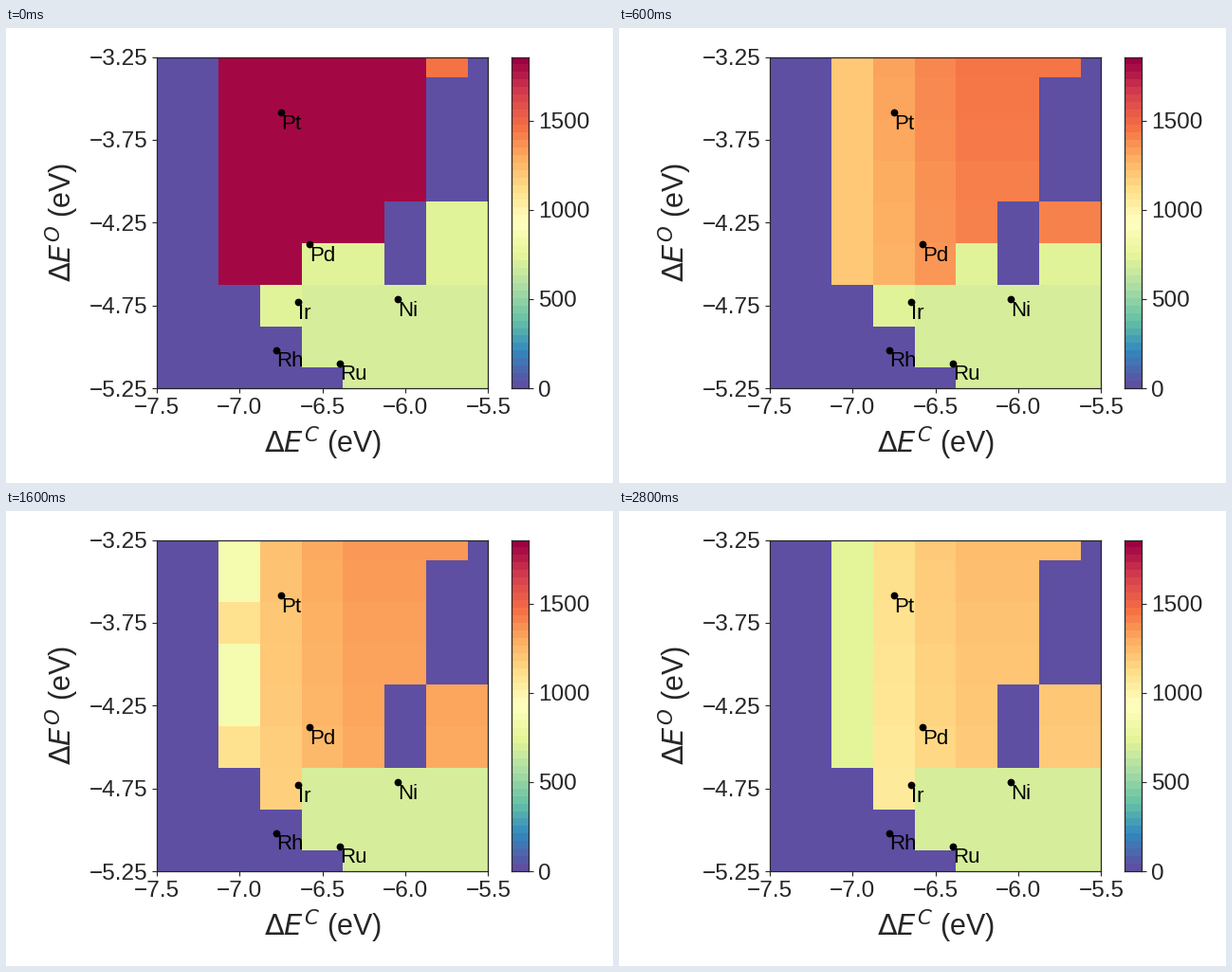
Animation of 640 by 480 pixels, one loop 3 s. Source, as a matplotlib script:

```python
import numpy as np
import matplotlib as mpl
import matplotlib.pyplot as plt
from matplotlib.animation import FuncAnimation

W, H = 640, 480
FRAMES, INTERVAL = 15, 200
VMAX = 1856
DARK = "#262626"

mpl.rcParams.update({
    "font.family": "Liberation Sans",
    "mathtext.fontset": "dejavusans",
    "axes.edgecolor": DARK,
    "axes.linewidth": 0.9,
    "xtick.color": DARK,
    "ytick.color": DARK,
    "xtick.labelsize": 17.6,
    "ytick.labelsize": 17.6,
})

# Nine by nine cells, row 0 at the top.
row, col = np.indices((9, 9))

# Cells that stay at zero: left side, lower-left stairs, notch, right block.
dead = (col < 2) | (row > col + 3)
dead |= (col == 6) & (row > 3) & (row < 6)
dead |= (col > 6) & (row < 4) & (row + col != 7)

# Step at which each cell becomes hot; the lower right never does.
onset = np.zeros((9, 9))
onset[4, 7:] = 1
onset[5, 4] = 1
onset[5, 5:] = 4
onset[6, 3] = 5
onset[6, 4:] = onset[7:] = np.inf
cool = np.where((onset > 0) & (onset < np.inf), 730, 695)

# Columns left of centre lose heat faster; heat also falls down the rows.
dist = np.maximum(0, 5 - col)
loss = 15 * dist**2 + 35 * dist + np.where(col > 2, 10 * (row - 2), 0)

# The leftmost hot column collapses; every third row does so later.
collapse = np.where(row % 3 == 2, 9, 5)


def grid(t):
    heat = np.interp(t, [0, 1, 3, 4, 5, 8, 10, 14],
                     [1830, 1605, 1443, 1385, 1385, 1340, 1278, 1225])
    if t < 1:
        heat = np.where(col > 6, 1470, heat)
    spread = np.interp(t, [0, 1, 3], [0, 0.15, 1])
    drop = 250 * (col == 2) * np.clip((t - collapse) / 1.5, 0, 1)
    g = np.where(t >= onset, heat - spread * loss - drop, cool)
    return np.where(dead, 0, g)


def pixel_axes(x, y, w, h):
    return fig.add_axes([x / W, 1 - (y + h) / H, w / W, h / H])


fig = plt.figure(figsize=(W / 100, H / 100), dpi=100, facecolor="white")

ax = pixel_axes(158.9, 30.55, 349.5, 349.5)
mesh = ax.pcolormesh(np.linspace(-7.625, -5.375, 10),
                     np.linspace(-3.125, -5.375, 10), grid(0),
                     cmap="Spectral_r", vmin=0, vmax=VMAX)
ax.set(xlim=(-7.5, -5.5), ylim=(-5.25, -3.25),
       xticks=np.arange(-7.5, -5.4, 0.5), yticks=np.arange(-5.25, -3.2, 0.5))
ax.xaxis.set_major_formatter(lambda v, _: f"{v:.1f}".replace("-", "\u2212"))
ax.yaxis.set_major_formatter(lambda v, _: f"{v:.2f}".replace("-", "\u2212"))

bar = pixel_axes(533, 30.55, 18, 349.5)
bar.pcolormesh([0, 1], np.linspace(0, VMAX, 45), np.arange(44)[:, None],
               cmap="Spectral_r")
bar.set(xticks=[], yticks=range(0, 1501, 500))
bar.yaxis.tick_right()

for x, y, label, angle in ((334.5, 448, "C", 0), (69, 205, "O", 90)):
    fig.text(x / W, 1 - y / H, rf"$\Delta E^{label}$ (eV)", color=DARK,
             fontsize=22, ha="center", va="baseline",
             rotation=angle, rotation_mode="anchor")

metals = {"Pt": (-6.75, -3.585), "Pd": (-6.58, -4.38), "Ir": (-6.648, -4.73),
          "Ni": (-6.046, -4.712), "Rh": (-6.78, -5.02), "Ru": (-6.396, -5.1)}
for name, point in metals.items():
    ax.plot(*point, "o", color="black", markersize=5.6, markeredgewidth=0)
    ax.annotate(name, point, xytext=(0, -12.6), textcoords="offset points",
                fontsize=16, color="black", ha="left", va="baseline")


def draw(step):
    mesh.set_array(grid(step))
    return [mesh]


anim = FuncAnimation(fig, draw, frames=FRAMES, interval=INTERVAL,
                     repeat=True, repeat_delay=0, blit=False)
plt.show()
```
